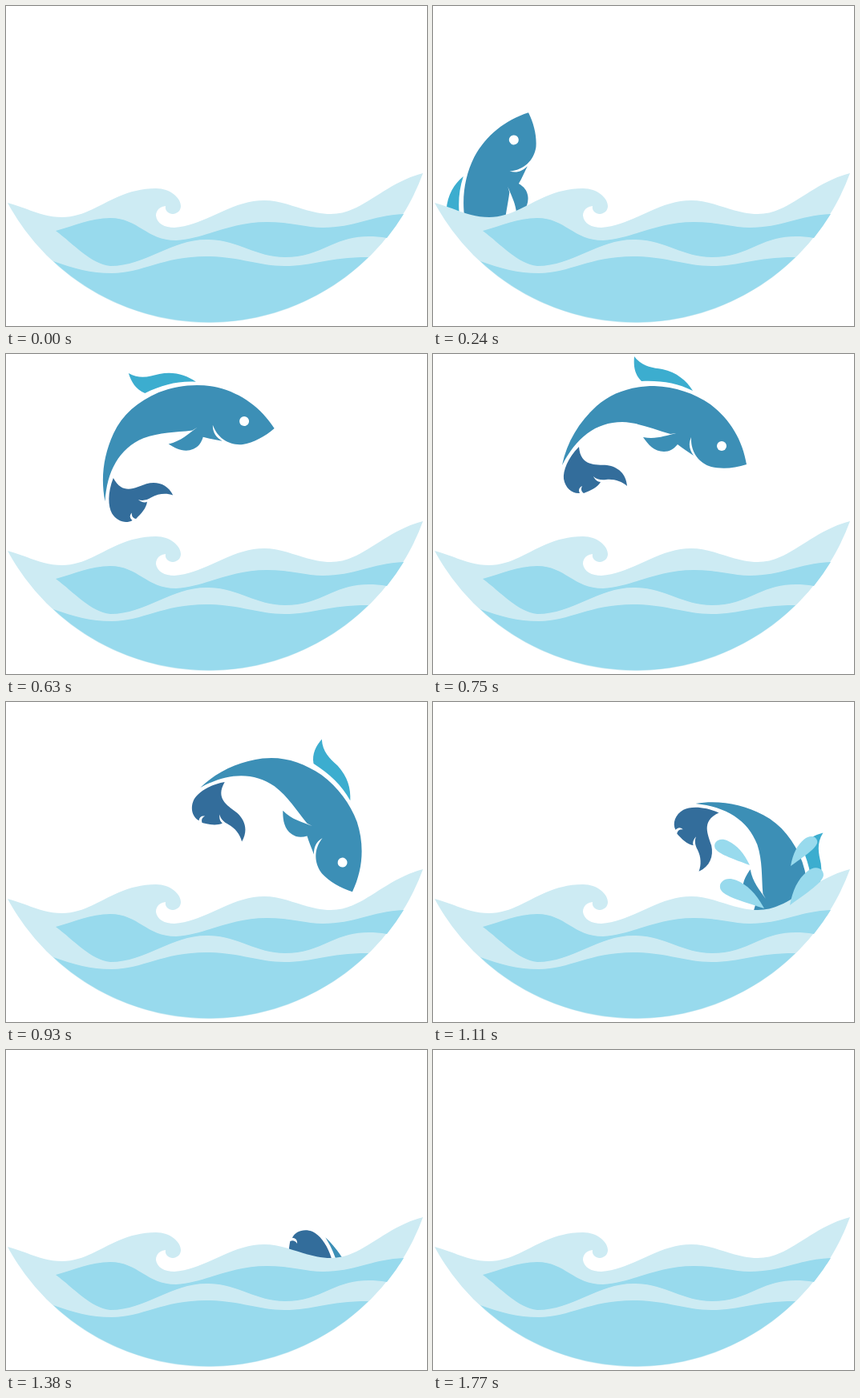
Animation of 525x400 px, one loop 1.8 s. Source, as an HTML page:

```html
<!DOCTYPE html>
<html lang="en">
<head>
<meta charset="utf-8">
<title>Leaping fish</title>
<style>
html, body { margin: 0; width: 100%; height: 100%; overflow: hidden; background: #fff; }
svg { display: block; width: 525px; height: 400px; }
</style>
</head>
<body>
<svg viewBox="0 0 525 400">
  <clipPath id="air"><path d="M0 0H525V265H22L2 246H0Z"/></clipPath>
  <g clip-path="url(#air)">
    <g id="fish">
      <path fill="#3cadcf" d="M251 3C261 16 273 17 286 19C304 23 316 33 324 46C304 36 284 33 260 34C251 25 250 14 251 3Z"/>
      <path fill="#3c8fb6" d="M161 139C167 110 182 85 204 65C223 48 248 40 276 40C302 41 326 49 346 63C371 82 386 108 391 138C376 143 360 144 347 141C331 136 321 122 322 104C318 113 320 120 325 127C318 122 311 118 305 113C300 119 295 122 288 122C276 122 268 113 262 104C278 107 290 102 303 99L296 100C275 94 258 86 236 85C203 85 178 105 161 139Z"/>
      <circle cx="360" cy="115" r="6" fill="#fff"/>
      <path fill="#336d9b" d="M182 116C168 130 162 146 163 156C165 168 174 175 183 174C181 170 182 167 186 165C184 169 185 172 188 174C196 171 205 167 209 160C205 160 202 157 200 153C204 157 210 158 216 157C226 156 235 159 242 165C241 150 231 141 217 139C203 138 184 141 182 116Z"/>
    </g>
  </g>
  <path fill="#cdebf3" d="M2 246C25 252 45 264 70 264C110 264 135 228 187 228C205 228 218 240 218 250C218 257 212 260 207 260C202 259 198 256 199 250C191 251 187 256 187 262C188 272 198 277 210 277C250 274 280 243 322 243C350 243 375 260 405 260C445 260 470 222 520 209A284.5 284.5 0 0 1 2 246Z"/>
  <g fill="#98daed">
    <path d="M62 281C85 275 105 265 130 265C165 265 175 293 212 293C250 290 280 270 325 270C355 270 375 277 395 277C435 277 455 262 496 260A284.5 284.5 0 0 1 475 290C445 285 425 290 405 299C385 308 370 314 348 314C310 314 290 292 250 292C205 292 175 325 130 325C105 322 85 298 62 281Z"/>
    <path d="M59 319C85 328 105 334 132 334C170 334 195 313 250 313C290 313 315 325 347 325C385 325 400 314 452 314A284.5 284.5 0 0 1 59 319Z"/>
    <g id="splash"></g>
  </g>
</svg>
<script>
const LOOP = 1800, STEP = 30, SPIN = 0.193;
const fish = document.getElementById('fish');
const splash = document.getElementById('splash');

// tip x, tip y, direction, size, mirror
const drops = [
  [395, 204, 215, 1.04, -1],
  [413, 258, 212, 1.27, -1],
  [446, 205, -50, 0.95, 1],
  [445, 254, -50, 1.2, 1]
].map(([x, y, angle, size, flip]) => {
  const el = document.createElementNS('http://www.w3.org/2000/svg', 'path');
  el.setAttribute('d', 'M0 0C14 -8 26 -11 38 -9C50 -7 52 3 46 7C40 10 30 8 0 0Z');
  splash.append(el);
  return { el, x, y, angle, size, flip };
});

function draw(now) {
  const t = Math.floor(now % LOOP / STEP) * STEP;
  fish.setAttribute('transform', `rotate(${(t - 750) * SPIN} 253 253)`);

  const grow = Math.max(0, Math.min(1, (t - 960) / 120, (1290 - t) / 120));
  const shift = (t - 1110) * 0.2;
  splash.style.display = grow ? '' : 'none';
  for (const { el, x, y, angle, size, flip } of drops) {
    const s = size * grow;
    el.setAttribute('transform',
      `translate(${x} ${y}) rotate(${angle}) translate(${shift} 0) scale(${s} ${s * flip})`);
  }
}

let start;
function tick(now) {
  start ??= now;
  draw(now - start);
  requestAnimationFrame(tick);
}
draw(0);
requestAnimationFrame(tick);
</script>
</body>
</html>
```
